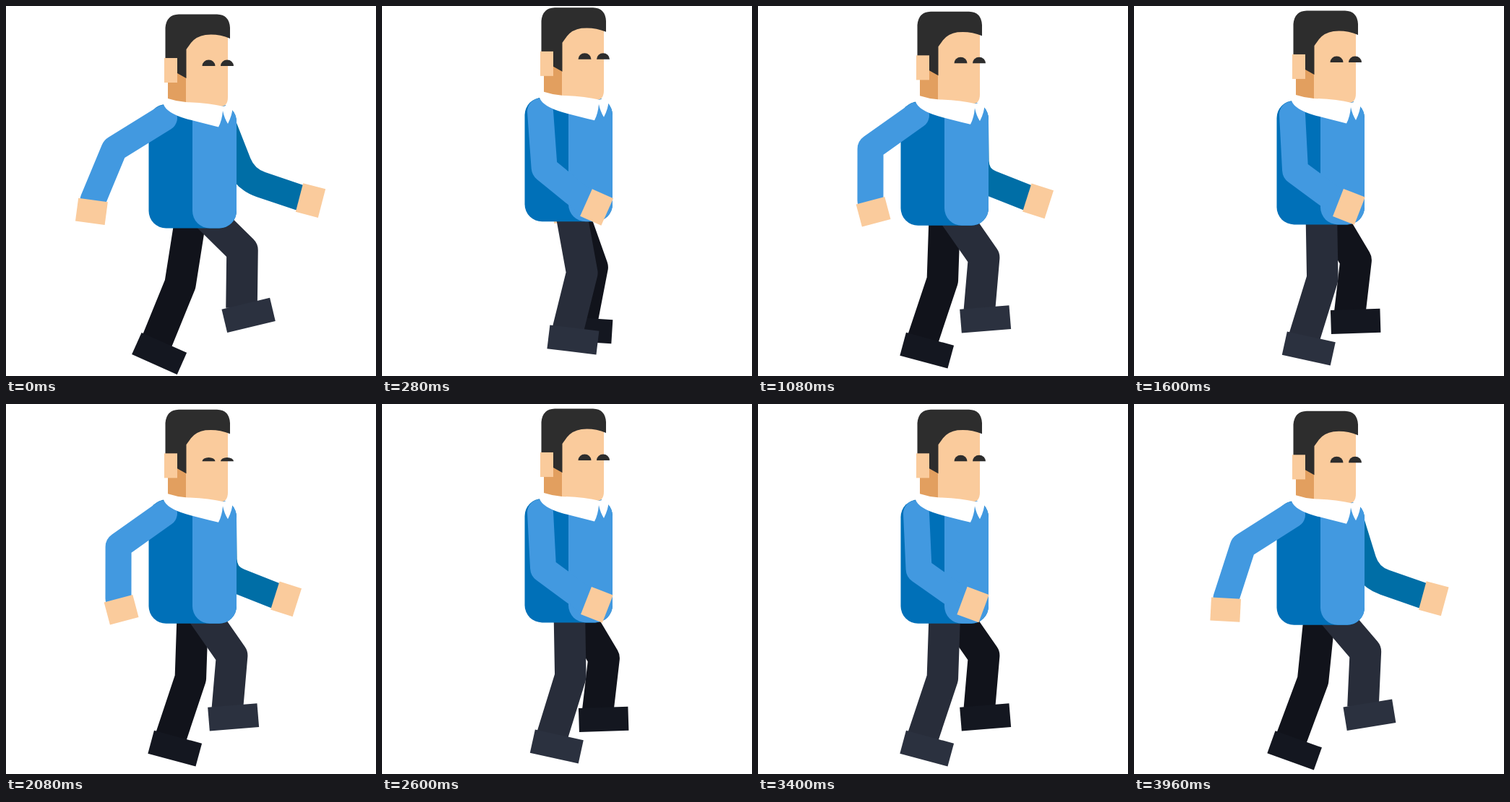
Recreate the animation shown at these times as an HTML page. Size 512 by 512 pixels, loop 4 s.

```html
<!DOCTYPE html>
<html lang="en">
<head>
<meta charset="utf-8">
<title>Walking man</title>
<style>
  html, body { margin: 0; width: 100%; height: 100%; overflow: hidden; background: #fff; }
  svg { display: block; width: 100%; height: 100%; }
  .leg, .arm { fill: none; stroke-linejoin: round; }
  .leg { stroke-width: 43.5; }
  .arm { stroke-width: 36; stroke-linecap: round; }
  .skin { fill: #facb9c; }
</style>
</head>
<body>
<svg viewBox="0 0 512 512">
  <g id="farArm">
    <path class="arm" stroke="#006ea6"/>
    <rect class="skin" y="-20.5" width="32" height="41"/>
  </g>
  <g id="farLeg">
    <path class="leg" stroke="#11131b"/>
    <rect fill="#141720" x="-25" y="-1" width="68.500" height="33"/>
  </g>
  <g id="nearLeg">
    <path class="leg" stroke="#282d3a"/>
    <rect fill="#2b313f" x="-25" y="-1" width="68.500" height="33"/>
  </g>
  <g class="body">
    <rect x="197.500" y="136" width="121.500" height="171.5" rx="24" fill="#0070b8"/>
    <path fill="#4299e0" d="M258 136H295A24 24 0 0 1 319 160V283.5A24 24 0 0 1 295 307.5H282A24 24 0 0 1 258 283.5Z"/>
    <path fill="#e29f5f" d="M224 90H252V140L224 130Z"/>
    <path class="skin" d="M249 45L262 36H307V126Q307 139 297 139L249 136Z"/>
    <path fill="#2d2d2d" d="M220.500 74V30Q222 12 239 11.500H292Q309 12 310 30V45Q293 38 276 40Q263 42 256 51L249.500 60V100L237 93V74Z"/>
    <rect class="skin" x="219" y="72" width="18" height="34"/>
    <g id="eyes" fill="#2d2d2d">
      <path d="M-9 0A9 8.500 0 0 1 9 0Z" transform="translate(280.500)"/>
      <path d="M-9 0A9 8.500 0 0 1 9 0Z" transform="translate(306)"/>
    </g>
  </g>
  <g id="nearArm">
    <path class="arm" stroke="#4299e0"/>
    <rect class="skin" y="-20.5" width="32" height="41"/>
  </g>
  <path class="body" fill="#fff" d="M218 136L224 128Q236 132 249 133Q280 134 301 139Q306 138 308 134L313 136Q315 147 307 163Q302 155 300 145Q299 158 294 167.500Q268 161 249 156Q222 148 218 136Z"/>
</svg>
<script>
const get = id => document.getElementById(id);
const bodies = document.querySelectorAll('.body');
const lerp = (a, b, u) => a + (b - a) * u;
const ease = u => Math.sin(Math.PI / 2 * Math.min(1, u)) ** 2;
const deg = 180 / Math.PI;

function place(id, path, x, y, angle) {
  const [limb, end] = get(id).children;
  limb.setAttribute('d', path);
  end.setAttribute('transform', `translate(${x} ${y}) rotate(${angle})`);
}

// u: 0 = foot in front, 1 = foot behind
function drawLeg(id, u) {
  const wave = Math.sin(2 * Math.PI * u);
  const kx = lerp(327, 241, u), ky = lerp(338, 385, u) + 16 * u * (1 - u);
  const x = lerp(326, 208, u), y = lerp(415, 463, u) - 5 * wave;
  const path = `M259 271L${kx} ${ky}L${x} ${y + 3}`;
  place(id, path, x + lerp(-3, 2, u), y, lerp(-13.5, 24, u) + 3 * wave);
}

// Two-bone arm, slightly elastic, elbow always behind
function drawArm(id, sx, sy, x, y, upper, lower, rest, tilt, bend) {
  const dx = x - sx, dy = y - sy, d = Math.hypot(dx, dy);
  const stretch = (d - rest) * 0.22;
  const a = upper + stretch, b = lower + stretch;
  const cos = (a * a + d * d - b * b) / (2 * a * d);
  const angle = Math.atan2(dy, dx) + Math.acos(Math.min(1, cos));
  const ex = sx + a * Math.cos(angle), ey = sy + a * Math.sin(angle);
  const near = (px, py) => `${lerp(ex, px, bend)} ${lerp(ey, py, bend)}`;
  const path = `M${sx} ${sy}L${near(sx, sy)}Q${ex} ${ey} ${near(x, y)}L${x} ${y}`;
  place(id, path, x, y, Math.atan2(y - ey, x - ex) * deg + tilt);
}

function draw(time) {
  const phase = time % 1000, left = 1000 - phase, half = 480;
  const stride = phase < half ? phase / half : left / (1000 - half);
  const lift = 11 * (1 - Math.abs(1 - 2 * stride));
  const swing = Math.min(ease(phase / 260), ease(left / 300));

  for (const part of bodies) part.setAttribute('transform', `translate(0 ${-lift})`);
  drawLeg('nearLeg', stride);
  drawLeg('farLeg', 1 - stride);
  drawArm('nearArm', 219, 155 - lift, lerp(120.5, 282.5, swing), lerp(268.5, 272, swing), 78.5, 73.5, 137, -15, 0.02);
  drawArm('farArm', 301, 165 - lift, lerp(406, 250, swing), 265, 80, 80, 145, -4, 0.3);

  const blink = Math.max(0, 1 - Math.abs(time % 1500 - 590) / 110);
  get('eyes').setAttribute('transform', `translate(0 83) scale(1 ${1 - 0.4 * blink})`);
}

const start = performance.now();
function tick() {
  const time = (performance.now() - start) % 4000;
  draw(Math.floor(time / 40) * 40);
  requestAnimationFrame(tick);
}
draw(0);
tick();
</script>
</body>
</html>
```
